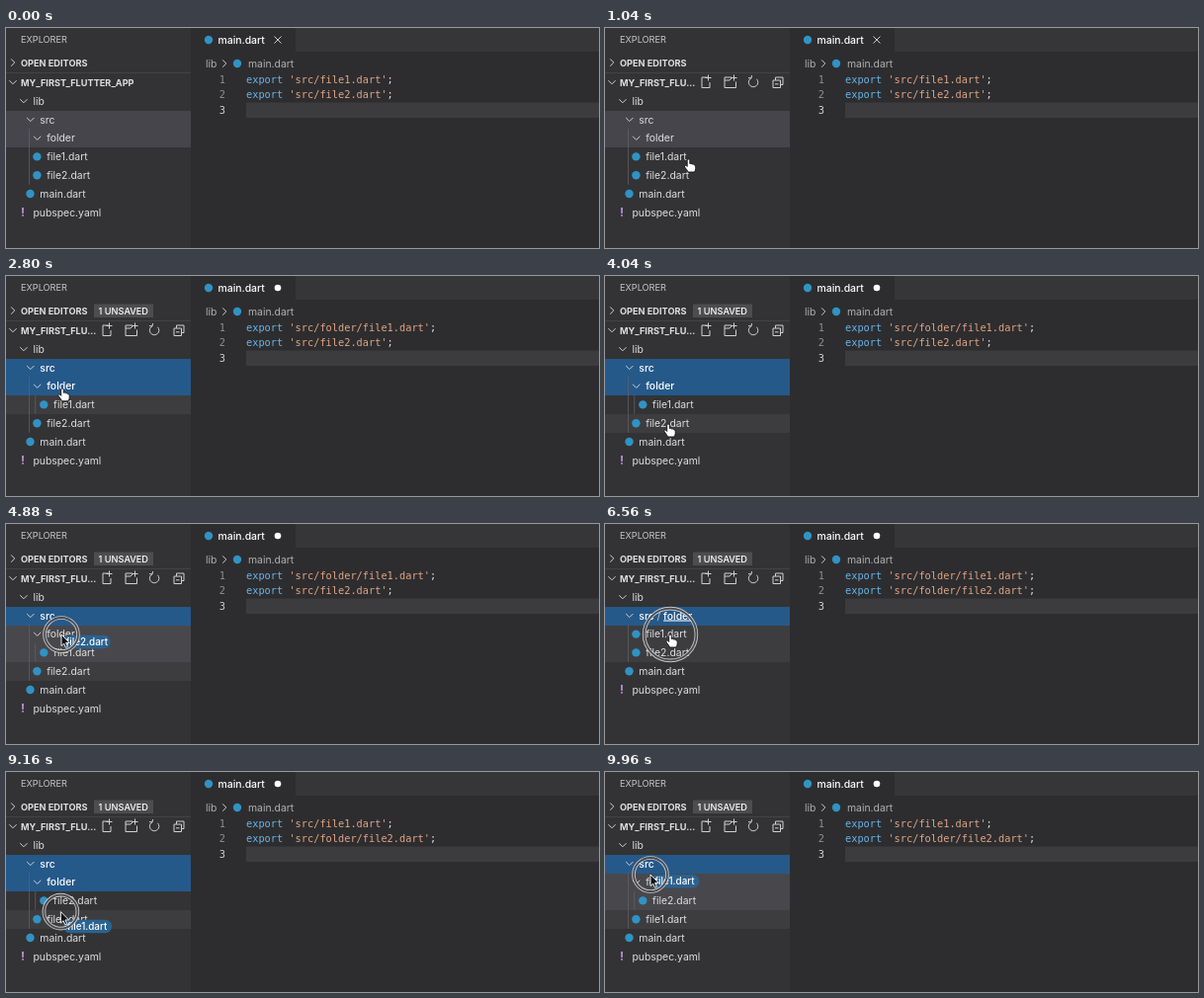
Write an HTML page that moves like this. It is 600 px wide and 223 px high and loops after 10000 ms.

```html
<!DOCTYPE html>
<html lang="en">
<head>
<meta charset="utf-8">
<title>Moving files in the explorer</title>
<style>
  html, body { margin: 0; width: 100%; height: 100%; overflow: hidden; background: #2d2d2f; }
  svg { display: block; width: 600px; height: 223px; }
  text { font: 10.4px Inter, "Open Sans", sans-serif; fill: #dededf; white-space: pre; }
  .head { font-size: 9.2px; font-weight: 700; }
  .small { font-size: 9.2px; fill: #c6c6c8; }
  .code { font: 10.3px "DejaVu Sans Mono", monospace; }
  .key { fill: #68b4ea; }
  .str { fill: #e2a585; }
  .num { fill: #8e8e90; text-anchor: end; }
  .dim { fill: #b0b0b2; }
  .on { fill: #fff; font-weight: 500; }
  .line { fill: none; stroke: #d0d0d1; stroke-width: 1; }
  .guide { stroke: #606064; stroke-width: .8; }
  .dart { fill: #3093c4; }
</style>
</head>
<body>
<svg viewBox="0 0 600 223">
  <defs>
    <path id="down" class="line" d="M-3.6-1.8L0 1.8L3.6-1.8"/>
    <path id="right" class="line" d="M-1.8-3.6L1.8 0L-1.8 3.6"/>
    <circle id="dart" class="dart" r="4.2"/>
  </defs>

  <rect width="187" height="223" fill="#333336"/>
  <rect x="187" width="413" height="24" fill="#363638"/>
  <rect x="187" width="106" height="24" fill="#2d2d2f"/>
  <rect x="243" y="75.5" width="357" height="15.5" fill="#3c3c3e"/>

  <text class="small" x="15" y="14.5">EXPLORER</text>
  <path d="M0 45.5H187" stroke="#434346"/>
  <use href="#right" x="7" y="35"/>
  <text class="head" x="15" y="38.5">OPEN EDITORS</text>
  <use href="#down" x="7" y="55"/>
  <text class="head" id="project" x="15" y="58.5"></text>
  <g id="unsaved">
    <rect x="89" y="28.5" width="60" height="13.5" fill="#4d4d50"/>
    <text x="93.5" y="38.7" class="on" style="font-size:9.2px">1 UNSAVED</text>
  </g>
  <g id="tools" class="line">
    <path d="M103.5 50H98V60.5H106V55M104.5 47.5V53.5M101.5 50.5H107.5"/>
    <path d="M128 50H121V60.5H132.5V54.5M121 53H126L128 51M130.5 47.5V53.5M127.5 50.5H133.5"/>
    <path d="M153.5 51.8A4.7 4.7 0 1 1 148 50.8M148.5 48L148 51L145 50.5"/>
    <path d="M170 53V60.5H177.5V53ZM172.5 53V50H180V57.5H177.5M172 56.8H175.5"/>
  </g>

  <use href="#dart" x="205" y="12"/>
  <text x="214.5" y="15.7" class="on">main.dart</text>
  <path id="close" class="line" d="M271.5 8.5L278.5 15.5M278.5 8.5L271.5 15.5"/>
  <circle id="dirty" cx="275" cy="12" r="3.3" fill="#fff"/>
  <text x="202" y="39.5" class="dim">lib</text>
  <use href="#right" x="221" y="36"/>
  <use href="#dart" x="234" y="36"/>
  <text x="245" y="39.5" class="dim">main.dart</text>

  <text class="code num" x="222" y="55.5">1</text>
  <text class="code num" x="222" y="71">2</text>
  <text class="code num" x="222" y="86.7" style="fill:#d0d0d1">3</text>
  <g id="code"></g>
  <g id="tree"></g>

  <g id="drag">
    <rect width="49" height="13.5" rx="6.7" fill="#2b628f"/>
    <text id="label" x="3.8" y="10.3" class="on" style="font-size:9.9px"></text>
  </g>
  <g id="pointer">
    <g id="ring" fill="none">
      <circle stroke="#ddd" stroke-width="3.6" stroke-opacity=".85"/>
      <circle stroke="#4a4a4d" stroke-width="1.8"/>
    </g>
    <path id="arrow" d="M0 0V11.5L2.7 9.2L4.5 13.2L6.4 12.4L4.6 8.4H8.2Z"
      fill="#111" stroke="#fff" stroke-width=".9"/>
    <path id="hand" d="M-1.3 1.2Q-1.3 0 0 0T1.3 1.2V4.5Q2.8 3.8 3.5 5Q5 4.5 5.6 5.800Q7.2 5.6 7.2 7.2V9.5Q7.2 11 6 13H-.5Q-1.2 11-3.8 8Q-4.7 6.6-3.5 6.2T-1.3 7.5Z"
      fill="#fff" stroke="#111" stroke-width=".9"/>
  </g>
</svg>
<script>
const LOOP = 10000, ROW = 18.8, TOP = 74;
const el = id => document.getElementById(id);
const show = (id, on) => { el(id).style.display = on ? '' : 'none'; };

// Row: [depth, name]; a trailing slash marks a folder.
const tree = (...inner) => [[0, 'lib/'], ...inner, [1, 'main.dart'], [0, 'pubspec.yaml']];
const flat = tree([1, 'src/'], [2, 'folder/'], [2, 'file1.dart'], [2, 'file2.dart']);
const nested = (a, b) => tree([1, 'src/'], [2, 'folder/'], [3, a], [2, b]);
const first = nested('file1.dart', 'file2.dart');
const second = nested('file2.dart', 'file1.dart');
const both = tree([1, 'src / folder/'], [2, 'file1.dart'], [2, 'file2.dart']);

const BLUE = '#25598a', IDLE = '#46454c', DROP = '#48484c', FAINT = '#3d3d40';
const fills = colors => colors.map((c, i) => [i + 1, c]).filter(f => f[1]);

// Each scene: start time, rows, row fills from the src row down.
const scenes = [
  [0, flat, fills([IDLE, IDLE])],
  [1080, flat, fills([IDLE, IDLE, FAINT])],
  [1280, flat, fills([BLUE, BLUE, FAINT])],
  [1880, flat, fills([BLUE, DROP, FAINT])],
  [2240, first, fills([BLUE, BLUE, FAINT])],
  [3640, first, fills([BLUE, BLUE, , FAINT])],
  [4600, first, fills([BLUE, DROP, DROP, FAINT])],
  [5160, both, fills([BLUE, FAINT, FAINT])],
  [7400, second, fills([BLUE, BLUE, , FAINT])],
  [9240, second, fills([BLUE, DROP, DROP, FAINT])]
];

// Folder prefix of each exported file.
const exportsAt = [
  [0, '', ''], [2320, 'folder/', ''], [5160, 'folder/', 'folder/'], [7440, '', 'folder/']
];

// Press, drag start, release, dragged file.
const drags = [
  [1280, 1400, 2160, 'file1.dart'], [4200, 4360, 5080, 'file2.dart'],
  [6500, 6700, 7340, 'file1.dart'], [8920, 9040, 10400, 'file1.dart']
];

// Pointer stops: time, x, y.
const path = [
  [0, 112, 250], [160, 110, 232], [1040, 84.5, 133], [1440, 84.5, 133], [2000, 57, 113.5],
  [3280, 57, 114], [3800, 64, 150], [4360, 64, 150], [4840, 56, 112], [5400, 56, 112],
  [6100, 66, 112], [6720, 66, 112], [7200, 40, 94], [8100, 40, 94], [8700, 58, 151],
  [9040, 58, 151], [9440, 46, 108], [9920, 46, 104], [10000, 46, 104]
];

const at = (list, t) => list.filter(s => s[0] <= t).pop();
const smooth = p => p * p * (3 - 2 * p);

function pointerAt(t) {
  const i = Math.max(1, path.findIndex(s => s[0] > t));
  const [t0, x0, y0] = path[i - 1], [t1, x1, y1] = path[i];
  const p = smooth((t - t0) / (t1 - t0));
  return [x0 + (x1 - x0) * p, y0 + (y1 - y0) * p];
}

function rowMarkup([depth, name], i, blue) {
  const y = TOP + i * ROW, x = 27.4 + depth * 6.9;
  const folder = name.endsWith('/');
  const label = name.replace(/\/$/, '')
    .replace(' / folder', '<tspan class="dim"> / </tspan><tspan text-decoration="underline">folder</tspan>');
  const icon = folder ? `<use href="#down" x="${x - 9.5}" y="${y}"/>`
    : name.endsWith('.dart') ? `<use href="#dart" x="${x - 9.8}" y="${y}"/>`
    : `<text x="${x - 12.5}" y="${y + 4}" style="fill:#b194d0;font-weight:700;font-size:12px">!</text>`;
  let guides = '';
  for (let d = 2; d <= depth; d++) {
    const gx = 23.5 + (d - 2) * 6.2;
    guides += `<path class="guide" d="M${gx} ${y - ROW / 2}V${y + ROW / 2}"/>`;
  }
  return guides + icon + `<text x="${x}" y="${y + 3.7}"${blue ? ' class="on"' : ''}>${label}</text>`;
}

// Whole-pixel edges keep neighbouring bands seamless.
const rowTop = i => Math.round(TOP + (i - .5) * ROW + .3);

function drawTree([, rows, marks]) {
  const bands = marks.map(([i, c]) =>
    `<rect y="${rowTop(i)}" width="187" height="${rowTop(i + 1) - rowTop(i)}" fill="${c}"/>`);
  const blue = new Set(marks.filter(m => m[1] === BLUE).map(m => m[0]));
  el('tree').innerHTML = bands.join('') + rows.map((r, i) => rowMarkup(r, i, blue.has(i))).join('');
}

function drawCode([, ...dirs]) {
  el('code').innerHTML = dirs.map((dir, i) =>
    `<text class="code" x="243" y="${55.5 + i * 15.5}"><tspan class="key">export</tspan> ` +
    `<tspan class="str">'src/${dir}file${i + 1}.dart'</tspan>;</text>`).join('');
}

function drawRing(t) {
  const d = drags.find(d => t >= d[0] && t < d[2] + 160);
  show('ring', d);
  if (!d) return;
  const left = Math.max(0, 1 - (t - d[0]) / 220);
  const out = Math.max(0, (t - d[2]) / 160);
  for (const c of el('ring').children) c.setAttribute('r', 17 + 18 * left * left + 9 * out);
  el('ring').style.opacity = 1 - out;
}

let scene, files;
function draw(t) {
  const nextScene = at(scenes, t), nextFiles = at(exportsAt, t);
  if (nextScene !== scene) drawTree(scene = nextScene);
  if (nextFiles !== files) drawCode(files = nextFiles);

  const hover = t >= 280, dirty = t >= 2320;
  el('project').textContent = hover ? 'MY_FIRST_FLU...' : 'MY_FIRST_FLUTTER_APP';
  show('tools', hover);
  show('unsaved', dirty);
  show('dirty', dirty);
  show('close', !dirty);

  const [x, y] = pointerAt(t);
  el('pointer').setAttribute('transform', `translate(${x} ${y})`);
  const drag = drags.find(d => t >= d[1] && t < d[2]);
  show('drag', drag);
  show('arrow', drag);
  show('hand', !drag);
  if (drag) {
    const [lx, ly] = pointerAt(t - 80);
    el('drag').setAttribute('transform', `translate(${lx + .5} ${ly})`);
    el('label').textContent = drag[3];
  }
  drawRing(t);
}

const start = performance.now();
function tick() {
  draw((performance.now() - start) % LOOP);
  requestAnimationFrame(tick);
}
tick();
</script>
</body>
</html>
```
